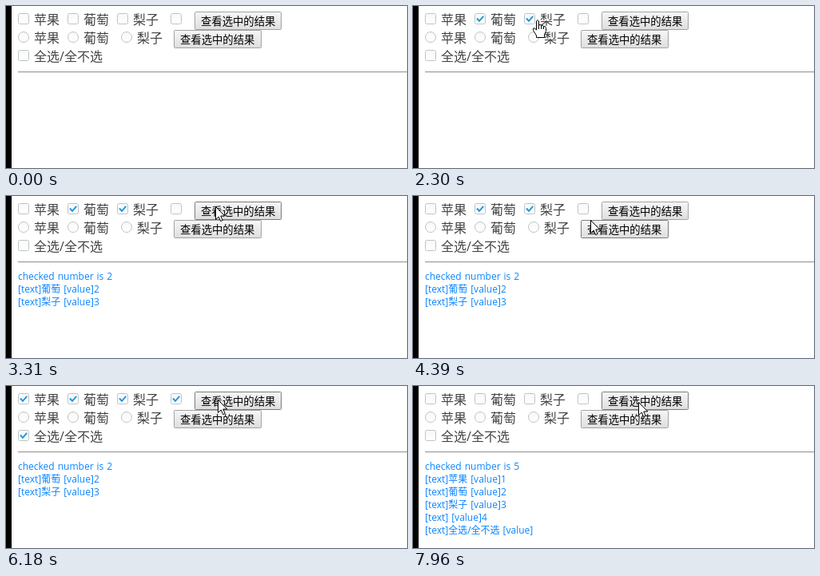
Write an HTML page that moves like this. It is 502 by 203 pixels and loops after 8 s.

```html
<!DOCTYPE html>
<html lang="zh-CN">
<head>
<meta charset="utf-8">
<title>复选框</title>
<style>
  html, body { margin: 0; width: 100%; height: 100%; overflow: hidden; background: #fff; }
  svg { display: block; }
  text { font-family: "Open Sans", "Noto Sans CJK SC", sans-serif; white-space: pre; }
  .label { font-size: 16px; fill: #444; }
  .button text { font-size: 13.333px; fill: #000; }
  .button rect { fill: url(#face); stroke: #a3a3a3; }
  .button.hover rect { stroke: #7c7c7c; }
  .button.press rect { fill: url(#pressed); stroke: #777; }
  .mark { fill: url(#well); stroke: #bfc3c5; }
  .mark.hover { stroke: #3d9fe0; }
  .tick { fill: none; stroke: #1c97e0; stroke-width: 2; }
  .output { font-size: 12px; fill: #0a84ff; word-spacing: .9px; }
  #pointer path { fill: #fff; stroke: #000; stroke-linejoin: round; }
</style>
</head>
<body>
<svg width="502" height="203" viewBox="0 0 502 203">
  <defs>
    <linearGradient id="face" x2="0" y2="1"><stop stop-color="#f6f6f6"/><stop offset="1" stop-color="#dedede"/></linearGradient>
    <linearGradient id="pressed" x2="0" y2="1"><stop stop-color="#d6d6d6"/><stop offset="1" stop-color="#ececec"/></linearGradient>
    <linearGradient id="well" x2="0" y2="1"><stop stop-color="#f8f8f8"/><stop offset="1" stop-color="#fff"/></linearGradient>
  </defs>
  <rect width="7" height="203"/>
  <path d="M15 82.5H502" stroke="#999"/>
  <path d="M15 83.5H502" stroke="#eee"/>
  <g id="form"></g>
  <g id="output"></g>
  <g id="pointer">
    <path id="arrow" d="M.5 .5V16.5L4.2 13L6.7 18.6L9.2 17.5L6.8 12H11.8Z"/>
    <g id="hand">
      <path d="M-1.5 2Q0 -1 1.5 2V7Q3.3 5.5 4.5 7.5Q6.3 6.5 7.5 8.5Q10 8 10.5 10.5V14.5L8.5 19V22.5H-1.5V20L-5.5 13.5Q-6.5 10.5 -4 10.7L-1.5 13Z"/>
      <path d="M1.5 7V12M4.5 7.5V12M7.5 8.5V12"/>
    </g>
  </g>
</svg>
<script>
const LOOP = 8000;
const FRAME = 78;
const CHECK_ALL = 5410, UNCHECK_ALL = 7500;
const FIRST_PRESS = 3160, SECOND_PRESS = 6330, PRESS_LENGTH = 150;

const $ = id => document.getElementById(id);
const form = $('form');
const fields = [];

function add(parent, tag, attrs, content) {
  const el = document.createElementNS('http://www.w3.org/2000/svg', tag);
  for (const key in attrs) el.setAttribute(key, attrs[key]);
  if (content) el.textContent = content;
  return parent.appendChild(el);
}

function field(x, y, mark, caption) {
  const text = add(form, 'text', { x: x + 20, y: y + 14, class: 'label' }, caption);
  const width = caption ? 20 + text.getComputedTextLength() : 14;
  const item = { x, y, mark, width };
  fields.push(item);
  return item;
}

function checkbox(x, y, caption, checkedAt = CHECK_ALL) {
  const mark = add(form, 'rect', { x: x + .5, y: y + .5, width: 13, height: 13, rx: 2 });
  const tick = add(form, 'path', { class: 'tick', d: `M${x + 3} ${y + 6.5}l3 3.3l5.2 -6` });
  return Object.assign(field(x, y, mark, caption), { tick, checkedAt });
}

function radio(x, y, caption) {
  const mark = add(form, 'circle', { cx: x + 7, cy: y + 7, r: 6.5 });
  field(x, y, mark, caption);
}

function button(x, y, width) {
  const group = add(form, 'g');
  add(group, 'rect', { x: x + .5, y: y + .5, width: width - 1, height: 22, rx: 1 });
  add(group, 'text', { x: x + 8, y: y + 17 }, '查看选中的结果');
  return { x, y, width, group };
}

const fruits = ['苹果', '葡萄', '梨子'];
const boxes = [
  checkbox(15, 9, fruits[0]),
  checkbox(77, 9, fruits[1], 1290),
  checkbox(139, 9, fruits[2], 1830),
  checkbox(206, 9, ''),
  checkbox(15, 55, '全选/全不选')
];
[15, 77, 144].forEach((x, i) => radio(x, 32, fruits[i]));
const boxButton = button(236, 7, 109);
const radioButton = button(210, 30, 110);

function result(...lines) {
  const group = add($('output'), 'g');
  lines.forEach((line, i) =>
    add(group, 'text', { x: 15, y: 105 + 16 * i, class: 'output' }, line));
  return group;
}
const entries = [...fruits, ''].map((name, i) => `[text]${name} [value]${i + 1}`);
const partial = result('checked number is 2', ...entries.slice(1, 3));
const full = result('checked number is 5', ...entries, '[text]全选/全不选 [value]');

// The pointer rests at each stop until the next move begins
const entrance = { x: 290, y: 163 };
const stops = [
  { start: 130, end: 910, x: 84, y: 10 },
  { start: 1290, end: 1830, x: 149, y: 17 },
  { start: 2300, end: 3010, x: 262, y: 13 },
  { start: 3690, end: 3770, x: 263, y: 14 },
  { start: 3940, end: 4010, x: 269, y: 20 },
  { start: 4160, end: 4940, x: 62, y: 63 },
  { start: 5020, end: 5090, x: 59, y: 57 },
  { start: 5640, end: 6180, x: 265, y: 17 },
  { start: 6630, end: 6950, x: 99, y: 74 },
  { start: 7030, end: 7270, x: 81, y: 64 },
  { start: 7500, end: 7960, x: 282, y: 20 }
];

const ease = p => (p + p * p * (3 - 2 * p)) / 2;

function pointerAt(t) {
  const i = stops.findLastIndex(stop => stop.start <= t);
  if (i < 0) return null;
  const from = stops[i - 1] || entrance, to = stops[i];
  const intervals = Math.round((to.end - to.start) / FRAME);
  const step = Math.floor((t + 1 - to.start) / (to.end - to.start) * intervals);
  const p = ease(Math.min(1, (step + 1) / (intervals + 1)));
  const mix = axis => Math.round(from[axis] + (to[axis] - from[axis]) * p);
  return { x: mix('x'), y: mix('y') };
}

const within = (p, x, y, w, h) =>
  !!p && p.x >= x && p.x < x + w && p.y >= y && p.y < y + h;
const show = (el, on) => el.style.display = on ? '' : 'none';

function drawButton({ x, y, width, group }, p, pressed) {
  group.setAttribute('class', 'button');
  group.classList.toggle('hover', within(p, x, y, width, 23));
  group.classList.toggle('press', pressed);
}

function draw(t) {
  const p = pointerAt(t);
  show($('pointer'), p);
  if (p) {
    const overField = fields.some(f => within(p, f.x, f.y - 1, f.width, 18));
    $('pointer').setAttribute('transform', `translate(${p.x} ${p.y})`);
    show($('hand'), overField);
    show($('arrow'), !overField);
  }
  for (const f of fields)
    f.mark.setAttribute('class', within(p, f.x, f.y, 14, 14) ? 'mark hover' : 'mark');
  for (const b of boxes) show(b.tick, t >= b.checkedAt && t < UNCHECK_ALL);

  const pressed = [FIRST_PRESS, SECOND_PRESS].some(at => t >= at && t < at + PRESS_LENGTH);
  drawButton(boxButton, p, pressed);
  drawButton(radioButton, p, false);
  const second = t >= SECOND_PRESS + PRESS_LENGTH;
  show(partial, t >= FIRST_PRESS + PRESS_LENGTH && !second);
  show(full, second);
}

const origin = performance.now();
function tick() {
  draw((performance.now() - origin) % LOOP);
  requestAnimationFrame(tick);
}
tick();
</script>
</body>
</html>
```
